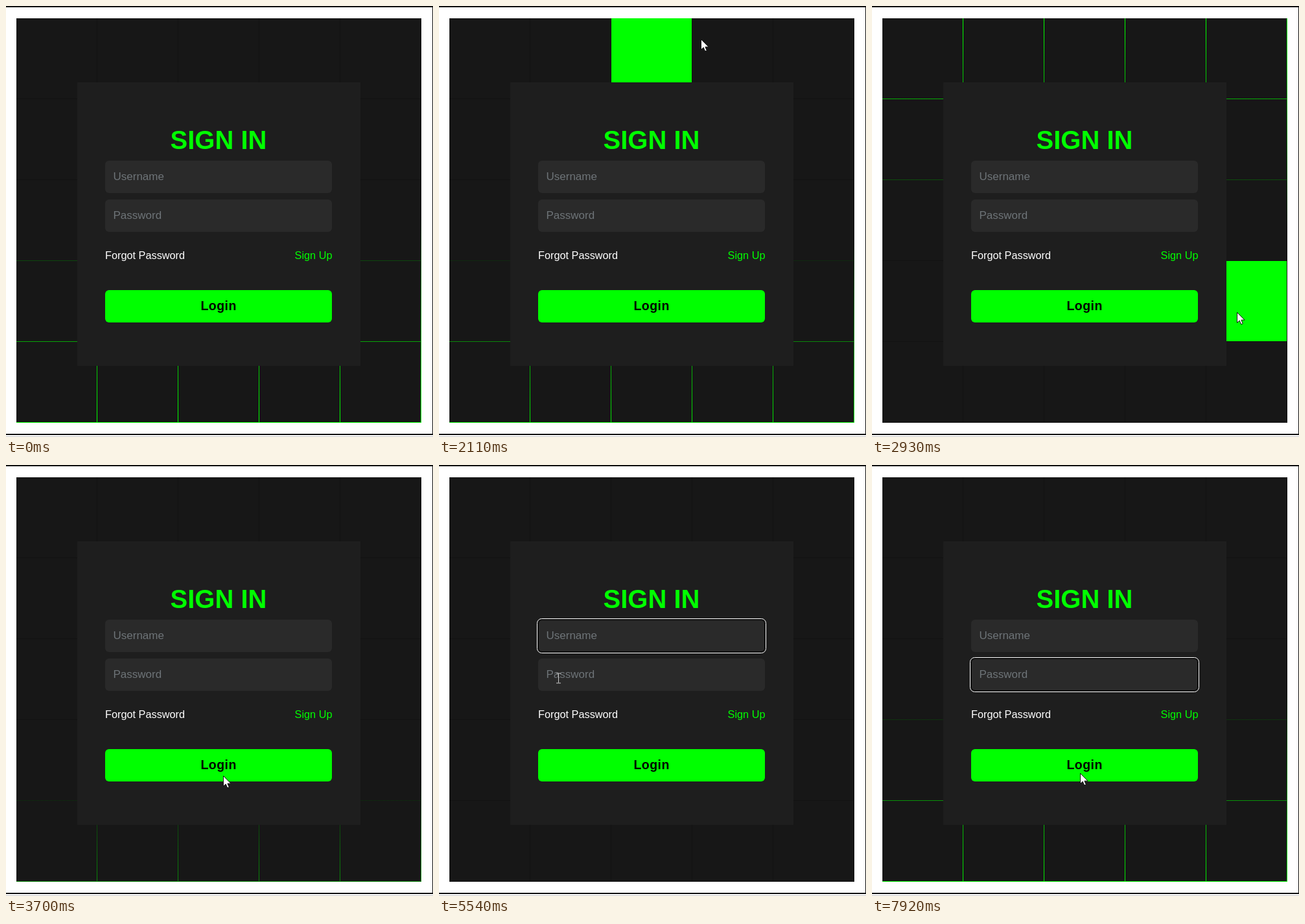
Write an HTML page that moves like this. It is 659 by 666 pixels and loops after 7990 ms.

```html
<!DOCTYPE html>
<html lang="en">
<head>
<meta charset="utf-8">
<title>Sign in</title>
<style>
  html, body { margin: 0; width: 100%; height: 100%; overflow: hidden; background: #fff; }
  svg { display: block; width: 659px; height: 666px; font-family: "Liberation Sans", Arial, sans-serif; }
  .field { fill: #2a2a2a; }
  .hint { fill: #6e7478; font-size: 17px; }
  .link { font-size: 16.3px; }
</style>
</head>
<body>
<svg viewBox="0 0 659 666">
  <defs>
    <linearGradient id="glow" gradientUnits="userSpaceOnUse" x1="0" x2="0">
      <stop stop-color="#121212"/><stop offset=".5" stop-color="#0f0"/><stop offset="1" stop-color="#121212"/>
    </linearGradient>
  </defs>

  <path fill="#111" d="M0 0H659V2H0zM658 0h1V662h-1zM0 661H659v2H0z"/>
  <path fill="#c4c4c4" d="M0 665H659v1H0z"/>

  <rect x="16" y="19" width="625" height="625" fill="#171717"/>
  <path id="lines" fill="url(#glow)"/>
  <rect id="tile" width="124" height="124" fill="#0f0"/>

  <rect x="110" y="118" width="437" height="438" fill="#1e1e1e"/>
  <text x="328" y="221" text-anchor="middle" font-size="40" font-weight="700" fill="#0f0">SIGN IN</text>
  <rect class="field" x="153" y="239" width="350" height="50" rx="6"/>
  <rect class="field" x="153" y="299" width="350" height="50" rx="6"/>
  <g id="focus" fill="none">
    <rect x="153" y="239" width="350" height="50" rx="6" stroke="#101010" stroke-width="2"/>
    <rect x="151.5" y="237.5" width="353" height="53" rx="7" stroke="#fff"/>
  </g>
  <text class="hint" x="165.5" y="269">Username</text>
  <text class="hint" x="165.5" y="329">Password</text>
  <text class="link" x="153" y="391" fill="#fff">Forgot Password</text>
  <text class="link" x="503.5" y="391" text-anchor="end" fill="#0f0">Sign Up</text>
  <rect x="153" y="439" width="350" height="50" rx="6" fill="#0f0"/>
  <text x="300.5" y="470" font-size="19.5" font-weight="700" letter-spacing=".45">Login</text>

  <path id="arrow" d="M0 0V16L3.7 12.6 6.2 18.4 8.8 17.3 6.4 11.7H11.5Z" fill="#fff" stroke="#111"/>
  <path id="caret" fill="none" stroke="#c8c8c8" d="M-3.5 -7.5H3.5M0 -7V7M-3.5 7.5H3.5"/>
</svg>
<script>
const LOOP = 7990, SWING = 2030, LEFT = 16, TOP = 19, SIZE = 625, CELL = 125;
const $ = id => document.getElementById(id);

// Pointer stops; it eases from one to the next.
const stops = [
  { t: 500, x: 150, y: 664 },
  { t: 1150, x: 185, y: 321 },
  { t: 2040, x: 355, y: 62 },
  { t: 2110, x: 405, y: 52 },
  { t: 2860, x: 581, y: 473 },
  { t: 3400, x: 228, y: 502 },
  { t: 3700, x: 336, y: 481 },
  { t: 4600, x: 200, y: 264 },
  { t: 5540, x: 185, y: 330 },
  { t: 7640, x: 400, y: 438 },
  { t: 7920, x: 322, y: 477 }
];

function pointerAt(t) {
  const next = stops.findIndex(s => s.t > t);
  if (next === 0) return null;
  if (next < 0) return stops.at(-1);
  const a = stops[next - 1], b = stops[next];
  const k = (t - a.t) / (b.t - a.t), ease = k * k * (3 - 2 * k);
  return { x: a.x + (b.x - a.x) * ease, y: a.y + (b.y - a.y) * ease };
}

const boxes = [...document.querySelectorAll('svg > rect')].map(r => r.getBBox());
const [stage, , card, username, password] = boxes;
const inside = (p, b) => p.x >= b.x && p.x < b.x + b.width && p.y >= b.y && p.y < b.y + b.height;
const show = (el, on) => el.setAttribute('visibility', on ? 'visible' : 'hidden');
const move = (el, x, y) => el.setAttribute('transform', `translate(${x} ${y})`);

let grid = '';
for (let d = CELL - 1; d < SIZE; d += CELL) {
  grid += `M${LEFT + d} ${TOP}h1v${SIZE}h-1z M${LEFT} ${TOP + d}h${SIZE}v1h${-SIZE}z`;
}
$('lines').setAttribute('d', grid);

// The glow leans in from the top, withdraws, then leans in from the bottom.
function drawGlow(t) {
  const swing = Math.cos(2 * Math.PI * (t - 945) / SWING);
  const reach = 470 * Math.abs(swing) - 140;
  const y = swing > 0 ? TOP + reach - SIZE : TOP + SIZE - reach;
  $('glow').setAttribute('y1', y);
  $('glow').setAttribute('y2', y + SIZE);
}

// The hovered tile lights up one step behind the pointer.
function drawTile(t) {
  const p = pointerAt(t - 70);
  const lit = p && inside(p, stage) && !inside(p, card);
  show($('tile'), lit);
  if (!lit) return;
  const snap = (v, start) => start + CELL * Math.floor((v - start) / CELL);
  move($('tile'), snap(p.x, LEFT), snap(p.y, TOP));
}

function drawPointer(t) {
  const p = pointerAt(t);
  const typing = p && (inside(p, username) || inside(p, password));
  show($('arrow'), p && !typing);
  show($('caret'), typing);
  if (p) move($(typing ? 'caret' : 'arrow'), Math.round(p.x) - .5, Math.round(p.y) - .5);
}

function draw(t) {
  drawGlow(t);
  drawTile(t);
  drawPointer(t);
  show($('focus'), t >= 4700);
  move($('focus'), 0, t < 5700 ? 0 : password.y - username.y);
}

const start = performance.now();
function tick() {
  draw((performance.now() - start) % LOOP);
  requestAnimationFrame(tick);
}
tick();
</script>
</body>
</html>
```
